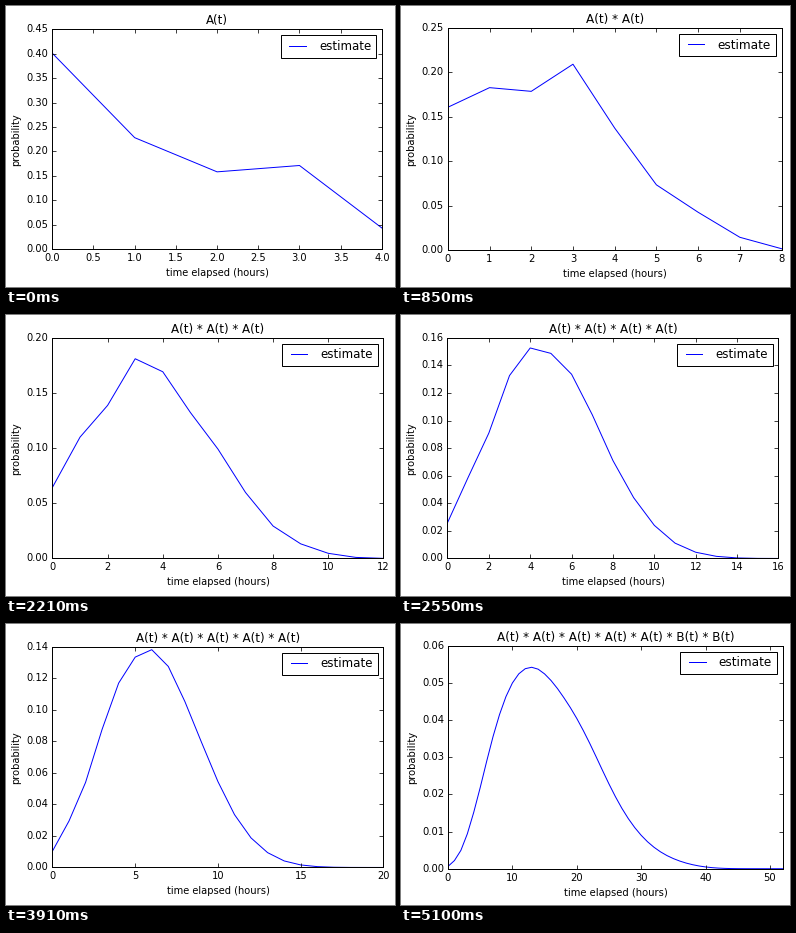
Write a matplotlib script that moves like this. It is 389x281 px and loops after 5.95 s.

```python
import math

import numpy as np
import matplotlib.pyplot as plt
from matplotlib.animation import FuncAnimation

W, H, DPI = 389, 281, 64
PLOT_W, PLOT_H = 334.8, 223.2
LEFT, MIDDLE = 47.0, 133.13

A = np.array([0.401, 0.228, 0.158, 0.171, 0.043])
# B starts with a spike, falls almost linearly and ends with a small rise.
B = np.interp(np.arange(17), [0, 1, 4, 12, 15, 16],
              [0.245, 0.084, 0.072, 0.022, 0.017, 0.034])
FACTORS = [("A(t)", A)] * 5 + [("B(t)", B)] * 2

plt.style.use("classic")
plt.rc("figure", facecolor="white")
plt.rc("savefig", dpi="figure")
plt.rc("font", family="DejaVu Sans")
fig = plt.figure(figsize=(W / DPI, H / DPI), dpi=DPI)


def set_scale(scale):
    """Size text, lines and gaps so that one unit is `scale` pixels."""
    u = scale * 72 / DPI
    plt.rc("font", size=10 * u)
    plt.rc("axes", linewidth=u, labelpad=5 * u, titlepad=5 * u)
    plt.rc("lines", linewidth=u)
    plt.rc("patch", linewidth=u)
    for tick in ("xtick.major", "ytick.major"):
        plt.rc(tick, size=4 * u, pad=4 * u, width=0.75 * u)


def convolve(factors):
    total = np.ones(1)
    for _, values in factors:
        total = np.convolve(total, values)
    return total


def nice_step(span):
    """Smallest 1-2-5 step that needs at most nine intervals."""
    raw = span / 9
    unit = 10 ** math.floor(math.log10(raw))
    return next(m * unit for m in (1, 2, 5, 10) if m * unit >= raw)


def fit_scale(end, step, fmt):
    """Shrink the plot when its last tick label sticks out on the right."""
    overhang = 0
    if end % step == 0:
        label = fmt.format(x=end)
        overhang = 3.2 * len(label) - 1.6 * label.count(".")
    return min(1, W / (387.1 + overhang))


def draw(n):
    factors = FACTORS[:n + 1]
    prob = convolve(factors)
    end = len(prob) - 1
    xstep, ystep = nice_step(end), nice_step(prob.max())
    ytop = math.ceil(prob.max() / ystep) * ystep
    xfmt = "{x:.1f}" if xstep < 1 else "{x:.0f}"

    scale = fit_scale(end, xstep, xfmt)
    set_scale(scale)
    width, height = PLOT_W * scale, PLOT_H * scale
    bottom = H - MIDDLE - height / 2

    fig.clear()
    ax = fig.add_axes([LEFT * scale / W, bottom / H, width / W, height / H])
    ax.plot(np.arange(end + 1), prob, color="blue", label="estimate")
    ax.set_xlim(0, end)
    ax.set_ylim(0, ytop)
    ax.set_xticks(np.arange(0, end + 0.01, xstep))
    ax.set_yticks(np.arange(0, ytop + ystep / 2, ystep))
    ax.xaxis.set_major_formatter(xfmt)
    ax.yaxis.set_major_formatter("{x:.2f}")
    ax.set_xlabel("time elapsed (hours)")
    ax.set_ylabel("probability")
    ax.set_title(" * ".join(name for name, _ in factors))
    ax.legend(loc="upper right")
    return []


anim = FuncAnimation(fig, draw, frames=len(FACTORS), interval=850, repeat=True)
plt.show()
```
